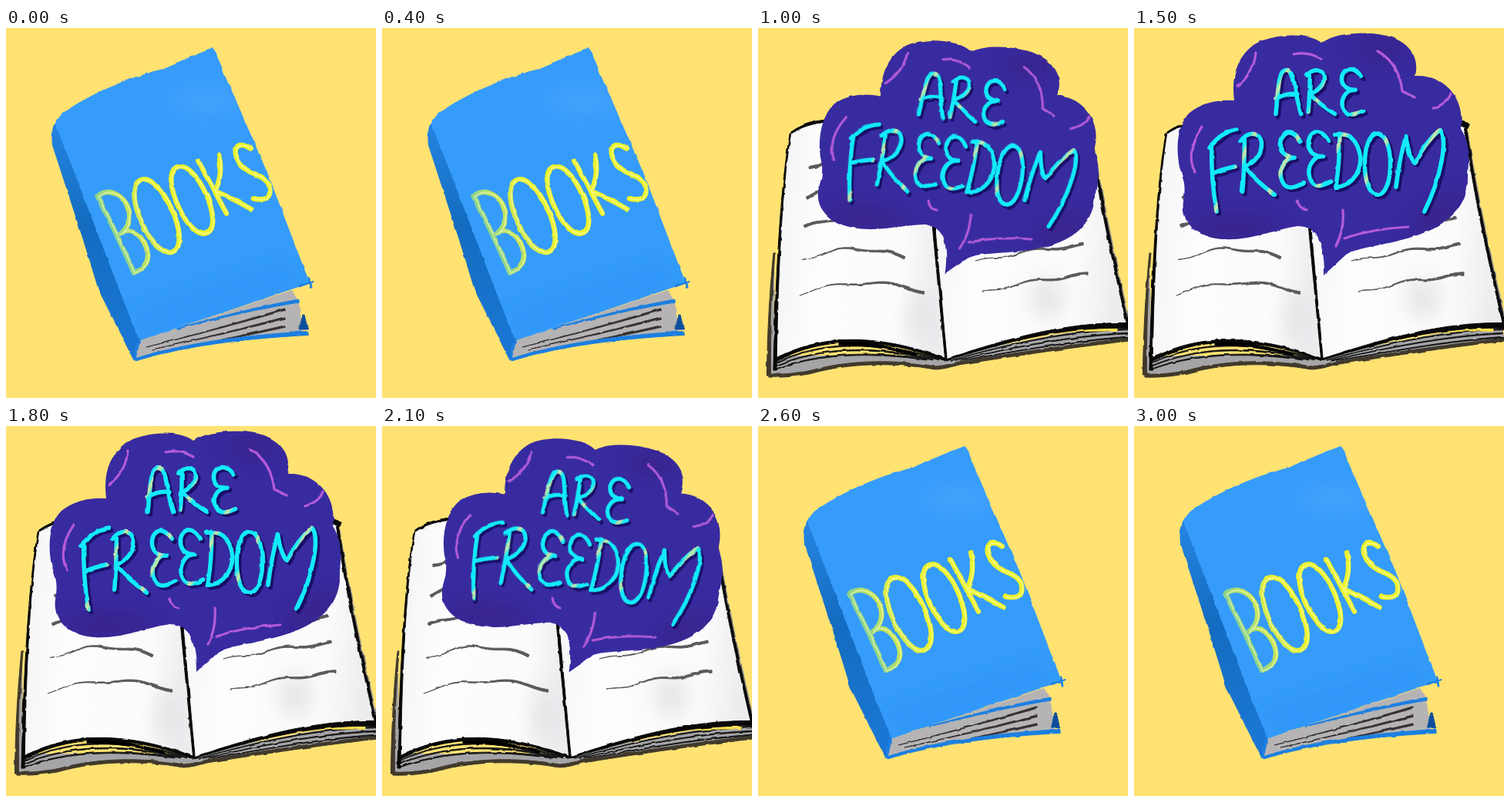
Write an HTML page that moves like this. It is 480x480 px and loops after 3100 ms.

```html
<!DOCTYPE html>
<html lang="en">
<head>
<meta charset="utf-8">
<title>Books are freedom</title>
<style>
html, body { margin: 0; height: 100%; overflow: hidden; background: #ffe272; }
svg { display: block; width: 100vw; height: 100vh; }
</style>
</head>
<body>
<svg viewBox="0 0 480 480" role="img" aria-label="Books are freedom">
  <defs>
    <filter id="rough" filterUnits="userSpaceOnUse" x="0" y="0" width="480" height="480" color-interpolation-filters="sRGB">
      <feTurbulence id="noise" type="fractalNoise" baseFrequency=".07" numOctaves="2"/>
      <feDisplacementMap in="SourceGraphic" scale="3" xChannelSelector="R" yChannelSelector="G"/>
    </filter>
    <filter id="soft" x="-50%" y="-50%" width="200%" height="200%"><feGaussianBlur stdDeviation="13"/></filter>
    <linearGradient id="spine" gradientUnits="userSpaceOnUse" x1="70" y1="130" x2="150" y2="400">
      <stop stop-color="#2483df"/><stop offset=".45" stop-color="#146cc0"/><stop offset="1" stop-color="#1a76d2"/>
    </linearGradient>
    <linearGradient id="gold" gradientUnits="userSpaceOnUse" x1="-8" x2="60">
      <stop stop-color="#8fd58a"/><stop offset=".5" stop-color="#cfe850"/><stop offset="1" stop-color="#ecf32c"/>
    </linearGradient>
    <linearGradient id="neon" gradientUnits="userSpaceOnUse" x1="0" y1="0" x2="46" y2="24" spreadMethod="repeat">
      <stop stop-color="#12eafa"/><stop offset=".8" stop-color="#12eafa"/><stop offset=".9" stop-color="#d8e6a0"/><stop offset="1" stop-color="#12eafa"/>
    </linearGradient>
    <linearGradient id="paper" x2="1" y2=".1">
      <stop stop-color="#f3f3f5"/><stop offset=".3" stop-color="#fdfdfd"/><stop offset=".8" stop-color="#fbfbfb"/><stop offset="1" stop-color="#ededf0"/>
    </linearGradient>
    <clipPath id="bubbleClip"><use href="#bubbleShape"/></clipPath>
    <clipPath id="coverClip"><use href="#coverShape"/></clipPath>
  </defs>
  <rect width="480" height="480" fill="#ffe272"/>
  <g filter="url(#rough)">
    <g id="closed">
      <path d="M172 406L371 340 379 354 386 396 300 405 235 413 168 430Z" fill="#b5b3b4"/>
      <path id="coverShape" d="M62 128Q65 119 74 110C120 78 170 62 200 54L240 37 268 26Q273 30 275 40L340 190 394 331 300 363 172 406Z" fill="#369cfc"/>
      <g clip-path="url(#coverClip)" filter="url(#soft)">
        <ellipse cx="260" cy="95" rx="45" ry="18" fill="#55aafa" opacity=".5"/>
        <path d="M165 370L360 305 390 325 180 405Z" fill="#258df2" opacity=".4"/>
      </g>
      <path d="M64 124Q58 136 60 152L100 275 120 340 166 432 173 405 149 345 105 230Z" fill="url(#spine)"/>
      <g id="title" transform="translate(149 266) rotate(-24.4)"></g>
    </g>
    <g id="open">
      <path d="M21 290L14 451Q40 452 70 446C120 432 180 432 230 441Q245 440 260 435C330 424 410 412 482 404V380L244 425 22 425Z" fill="#a5a5a8"/>
      <path d="M43 136Q60 124 85 121C130 116 190 122 219 142Q226 240 244 430C150 396 80 400 22 431Q26 230 43 136Z" fill="url(#paper)"/>
      <path d="M219 142C270 116 340 86 430 128Q444 230 480 386C390 384 310 410 244 430Q226 240 219 142Z" fill="url(#paper)"/>
      <g filter="url(#soft)" fill="#c8c8cc" opacity=".4">
        <ellipse cx="208" cy="375" rx="12" ry="35"/>
        <ellipse cx="290" cy="190" rx="14" ry="60" transform="rotate(18 290 190)"/>
        <ellipse cx="375" cy="350" rx="22" ry="28"/>
      </g>
      <g id="drawing"></g>
      <g id="bubble">
        <path id="bubbleShape" d="M247 320C247 300 245 285 238 270Q228 257 212 257C180 262 150 276 115 274C85 272 60 255 64 225Q68 205 62 190C52 160 56 125 72 110Q95 92 130 94C126 62 134 38 155 22C180 7 225 5 243 19C265 4 310 4 335 12C360 22 370 40 365 62C400 60 430 88 424 130C440 155 432 180 433 200C430 235 405 255 370 268C330 282 290 284 275 294Q260 308 247 320Z" fill="#382ba0"/>
        <g clip-path="url(#bubbleClip)" filter="url(#soft)" fill="#3a1c78" opacity=".6">
          <ellipse cx="130" cy="258" rx="60" ry="14"/>
          <ellipse cx="395" cy="240" rx="45" ry="14" transform="rotate(-35 395 240)"/>
          <ellipse cx="320" cy="28" rx="35" ry="14"/>
        </g>
        <path d="M134 76Q156 58 158 32M207 34Q226 30 243 40M316 30Q344 46 348 82L364 90M388 104Q407 98 411 85M79 187Q66 160 88 128M273 273Q310 260 356 258M271 236Q273 262 262 283M212 224Q214 234 224 236" fill="none" stroke="#b45bd8" stroke-width="3.2" stroke-linecap="round"/>
        <g id="speech"></g>
      </g>
    </g>
  </g>
</svg>
<script>
const $ = id => document.getElementById(id);
const title = $('title'), speech = $('speech'), closed = $('closed'), drawing = $('drawing');

function addPath(parent, d, attrs) {
  const path = document.createElementNS('http://www.w3.org/2000/svg', 'path');
  for (const [name, value] of Object.entries({ d, ...attrs })) path.setAttribute(name, value);
  return parent.appendChild(path);
}

// Tapered stroke along a path
function brush(parent, color, d, from, to) {
  const path = addPath(parent, d, { fill: color, stroke: color, 'stroke-linejoin': 'round' });
  const length = path.getTotalLength(), count = Math.ceil(length / 4), left = [], right = [];
  for (let i = 0; i <= count; i++) {
    const u = i / count, p = path.getPointAtLength(u * length);
    const a = path.getPointAtLength(u * length - 1), b = path.getPointAtLength(u * length + 1);
    const half = (from + (to - from) * u - 1) / 2 / Math.hypot(b.x - a.x, b.y - a.y);
    const nx = (a.y - b.y) * half, ny = (b.x - a.x) * half;
    left.push([p.x + nx, p.y + ny]);
    right.unshift([p.x - nx, p.y - ny]);
  }
  path.setAttribute('d', 'M' + left.concat(right).join('L') + 'Z');
}

// Hand lettering on a 10 by 10 grid: strokes, and width relative to height
const glyphs = {
  A: ['M0 10C1 4 1 0 4 0C8 0 7 5 10 10M0 6.5Q5 5 8.5 5.5', .5],
  B: ['M0 0Q1 5 .7 10M0 0C7 -.5 11 1.5 10 3C9 4.5 5 5 2 5.2C9 4.5 11 7 10 8.3C9 9.8 4 10 .7 10', .27],
  D: ['M1.9 0Q1.8 6 .3 10M0 .2C5 -.3 9 1 10 4.5C10 8 5 10 .5 10', .48],
  E: ['M9 1.5C5 -1.5 0 0 .7 2.5Q1.5 4.5 6.5 4.5C2 4.5 0 7 1.2 8.5C3 11 7 10 10 9.3', .46],
  F: ['M.8 1.8Q.5 6 2.6 10M0 2.2Q4 .3 10 0M1.4 5.3Q5 4.8 9.4 4.5', .33],
  K: ['M0 0Q.7 4 1.4 9M7.5 .5Q6 3.5 1 5.2Q6 7.5 10 10', .43],
  M: ['M.3 7Q1 3.5 2.2 .8Q2.8 3.5 4 4Q6 1.5 8.8 0C10.5 1 9 6 5.8 10', .63],
  O: ['M5 0C-1.5 0 -1.5 10 5 10C11.5 10 11.5 0 5 0', .43],
  R: ['M1.2 1Q1.2 6 .6 9.5M0 1.2C3 -.8 6.5 0 6.2 2C5.8 4 3 5 1.2 5.5Q5 8 10 10', .56],
  S: ['M9 1.2C5 -1 0 0 1 2.5C2 5 10 6 10 8C9 10.5 4 10 0 9', .33]
};

// Outline of a word; shape(u) gives height and middle line for u from -1 to 1
function lettering(word, x, gap, stretch, shape) {
  return [...word].map((letter, i) => {
    const [strokes, ratio] = glyphs[letter];
    const [height, middle] = shape(i / (word.length - 1) * 2 - 1);
    const width = height * ratio * stretch, left = x;
    x += width + gap;
    let n = 0;
    return strokes.replace(/-?\d*\.?\d+/g, v =>
      (n++ % 2 ? middle + (v / 10 - .5) * height : left + v / 10 * width).toFixed(1));
  }).join('');
}

function write(parent, d, color, width, offset = 0) {
  addPath(parent, d, {
    fill: 'none', stroke: color, 'stroke-width': width, 'stroke-linecap': 'round',
    'stroke-linejoin': 'round', transform: `translate(${offset} ${offset})`
  });
}

const books = lettering('BOOKS', -8, 8, 1, u => [94 - 16 * u, -1]);
write(title, books, 'url(#gold)', 6.5);
write(title, books, 'rgba(253,255,190,.6)', 1.6, 1);

const message = lettering('ARE', 184, 7, 1.15, () => [57, 83])
  + lettering('FREEDOM', 98, 5, 1, u => [68 + 38 * Math.abs(u) ** 3, 170 + 15 * u * u]);
write(speech, message, '#180e66', 6, 3);
write(speech, message, 'url(#neon)', 5.5);

// Closed book: page edges and rims
for (let k = 0; k < 3; k++)
  brush(closed, '#343032', `M${182 + 8 * k} ${414 + 3 * k}Q270 ${392 + 8 * k} 362 ${365 + 11 * k}`, 1, 3.5);
const rim = '#1b7fe0';
brush(closed, rim, 'M222 390Q310 366 380 354', 2, 5);
brush(closed, rim, 'M172 406L166 431Q250 404 392 396', 4, 6);
brush(closed, rim, 'M380 335L399 329', 3, 2);
brush(closed, rim, 'M393 324L395 337', 2, 3);
brush(closed, '#0e4f9c', 'M386 372L386 391', 3, 12);

// Lines of writing, wavy and tapered
function textLine(x0, x1, y, rise, arch, phase, from, to) {
  const points = Array.from({ length: 21 }, (_, i) => {
    const u = i / 20;
    return [x0 + (x1 - x0) * u, y - rise * u - arch * Math.sin(Math.PI * u) + 2 * Math.sin(13 * u + phase)];
  });
  brush(drawing, '#5a5a5c', 'M' + points.join('L'), from, to);
}
for (let i = 0; i < 5; i++)
  textLine(66 - 3 * i, 175 + 6 * (i - 1.4) ** 2, 181 + 37 * i + i * i, 3, 13, 2 * i, i < 3 ? 4.5 : 1, i < 3 ? 1 : 4.5);
for (let i = 0; i < 6; i++)
  textLine(246 + 9 * i, 403 + 5 * i, 178 + 25 * i + 1.6 * i * i, 18 + i, 3, i, 1, 4.5);

// Open book: cover rim, stacked pages, page outlines
const cover = '#40392b';
brush(drawing, cover, 'M21 292Q14 370 14 451', 3, 6);
brush(drawing, cover, 'M14 451Q40 452 70 446C120 432 180 432 230 441Q245 440 260 435C330 424 410 412 482 404', 5, 5);
for (let k = 1; k < 4; k++) {
  brush(drawing, '#151515', `M22 ${431 + 4 * k}C80 ${400 + 7 * k} 150 ${396 + 8 * k} ${243 - 8 * k} 430`, 2, 3);
  brush(drawing, '#151515', `M${244 + 6 * k} 431C310 ${410 + 5 * k} 390 ${386 + 7 * k} 480 ${386 + 5 * k}`, 1.5, 2.5);
}
brush(drawing, '#000', 'M105 408Q150 408 205 424', 8, 3);
brush(drawing, '#fbe04f', 'M386 396Q420 391 466 392', 2, 4);
brush(drawing, '#88888a', 'M433 135Q447 230 482 384', 1, 3);
const outline = '#080808';
brush(drawing, outline, 'M43 136Q60 124 85 121C130 116 190 122 219 142', 3, 8);
brush(drawing, outline, 'M222 141C270 116 340 86 434 128', 2, 7);
brush(drawing, outline, 'M42 137Q26 230 22 444', 2.5, 5);
brush(drawing, outline, 'M218 142Q226 240 244 430', 5, 3.5);
brush(drawing, outline, 'M430 130Q444 230 480 384', 4, 4);
brush(drawing, outline, 'M22 431C80 400 150 396 243 430', 5, 4);
brush(drawing, outline, 'M244 430C310 410 390 384 480 386', 3, 8);

const LOOP = 3100, STEP = 100, OPENS = 700, CLOSES = 2400;
let lastStep = -1;

function draw(now) {
  const step = Math.floor(now % LOOP / STEP);
  if (step !== lastStep) {
    lastStep = step;
    const time = step * STEP, isOpen = time >= OPENS && time <= CLOSES;
    closed.style.display = isOpen ? 'none' : '';
    $('open').style.display = isOpen ? '' : 'none';
    // The bubble swings up out of the gutter, then sinks back the same way
    const age = Math.max(0, Math.min(time - OPENS, CLOSES - time, 400));
    const grow = Math.max(0, Math.min(1, (age - 20) / 315));
    const size = grow * grow * (3 - 2 * grow), tilt = 13 * (1 - (age / 400) ** 3);
    $('bubble').style.display = size ? '' : 'none';
    $('bubble').setAttribute('transform',
      `translate(246 312) scale(${size}) translate(-246 -312) rotate(${tilt} 246 285)`);
    $('noise').setAttribute('seed', step % 4 + 1);
  }
  requestAnimationFrame(draw);
}
draw(0);
</script>
</body>
</html>
```
